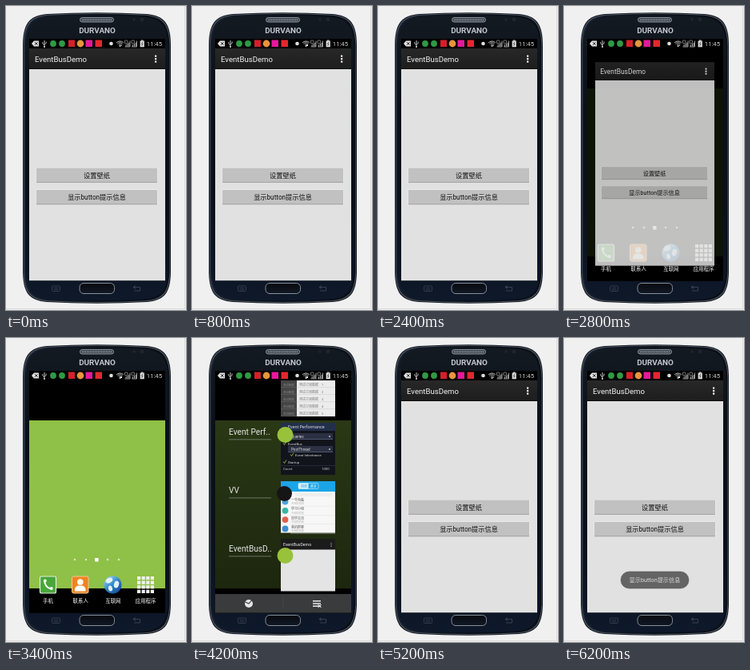
Recreate the animation shown at these times as an HTML page with a canvas. Size 225 by 380 pixels, loop 8000 ms.

```html
<!DOCTYPE html>
<html lang="zh-CN">
<head>
<meta charset="utf-8">
<title>EventBusDemo</title>
<style>
  html, body { margin: 0; width: 100%; height: 100%; overflow: hidden; background: #f0f0f0; }
  canvas { display: block; width: 225px; height: 380px; }
</style>
</head>
<body>
<canvas id="stage"></canvas>
<script>
const W = 225, H = 380, LOOP = 8000;
const SCREEN = { x: 29, y: 41, w: 170, h: 302.5 };
const FONT = 'Roboto, "Noto Sans CJK SC", "Noto Sans CJK", sans-serif';
const dpr = window.devicePixelRatio || 1;

function setup(canvas) {
  canvas.width = W * dpr;
  canvas.height = H * dpr;
  const c = canvas.getContext('2d');
  c.scale(dpr, dpr);
  return c;
}

const stage = setup(document.getElementById('stage'));
const layer = setup(document.createElement('canvas'));
let ctx = stage;

function rect(x, y, w, h, fill) {
  ctx.fillStyle = fill;
  ctx.fillRect(x, y, w, h);
}

function round(x, y, w, h, r, fill, stroke, line = 1) {
  ctx.beginPath();
  ctx.roundRect(x, y, w, h, r);
  if (fill) { ctx.fillStyle = fill; ctx.fill(); }
  if (stroke) { ctx.strokeStyle = stroke; ctx.lineWidth = line; ctx.stroke(); }
}

function disc(x, y, r, fill) {
  ctx.beginPath();
  ctx.arc(x, y, r, 0, Math.PI * 2);
  ctx.fillStyle = fill;
  ctx.fill();
}

function path(points, stroke, line = 1) {
  ctx.beginPath();
  points.forEach(([x, y], i) => i ? ctx.lineTo(x, y) : ctx.moveTo(x, y));
  ctx.strokeStyle = stroke;
  ctx.lineWidth = line;
  ctx.stroke();
}

function text(str, x, y, size, fill, align = 'left', style = '') {
  ctx.font = `${style} ${size}px ${FONT}`;
  ctx.textAlign = align;
  ctx.fillStyle = fill;
  ctx.fillText(str, x, y);
}

function gradient(x0, y0, x1, y1, ...colors) {
  const g = ctx.createLinearGradient(x0, y0, x1, y1);
  colors.forEach((c, i) => g.addColorStop(i / (colors.length - 1), c));
  return g;
}

// Phone outline with bowed top and bottom edges.
function drawBody(inset, fill) {
  const l = 21 + inset, r = 206 - inset, t = 8 + inset, b = 372 - inset;
  ctx.beginPath();
  ctx.moveTo(l, t + 42);
  ctx.bezierCurveTo(l, t + 14, l + 8, t + 4, l + 30, t + 2);
  ctx.quadraticCurveTo(113.5, t - 1.5, r - 30, t + 2);
  ctx.bezierCurveTo(r - 8, t + 4, r, t + 14, r, t + 42);
  ctx.lineTo(r, b - 38);
  ctx.bezierCurveTo(r - 1, b - 13, r - 8, b - 4, r - 30, b - 2);
  ctx.quadraticCurveTo(113.5, b + 1.5, l + 30, b - 2);
  ctx.bezierCurveTo(l + 8, b - 4, l + 1, b - 13, l, b - 38);
  ctx.closePath();
  ctx.fillStyle = fill;
  ctx.fill();
}

function drawPhone() {
  rect(0, 0, W, H, '#f0f0f0');
  rect(223, 0, 1, 379, '#d9d9d9');
  rect(0, 378, 224, 1, '#d9d9d9');

  drawBody(0, '#10151d');
  drawBody(0.8, '#4a535f');
  drawBody(1.7, gradient(21, 0, 206, 0, '#16202d', '#0a0f17', '#0a0e15'));
  drawBody(3.5, gradient(0, 8, 0, 372, '#141a22', '#0a0f17', '#0a101a', '#0e192b'));

  round(92.5, 14.5, 42, 5.5, 2.7, '#3c434d', '#a5abb3', 0.8);
  for (let x = 95; x < 133; x += 2) rect(x, 16, 1, 2.5, '#888e97');
  disc(160, 17, 1.8, '#20262e');
  disc(170, 17, 2.4, '#20262e');
  text('DURVANO', 114, 34, 9.9, '#c3c7ce', 'center', 'bold');

  round(92, 346.5, 43.5, 13, 5, gradient(0, 346, 0, 360, '#06090f', '#131a26'), '#969ba3', 0.9);
  round(57.5, 350, 10, 6.5, 1, null, '#3c4656', 0.8);
  for (let y = 352; y < 356; y += 2) rect(59.5, y, 6, 0.7, '#3c4656');
  path([[162, 349.5], [159, 351.5], [162, 353.5]], '#3c4656', 0.9);
  path([[159, 351.5], [167.5, 351.5], [167.5, 356], [160, 356]], '#3c4656', 0.9);
}

function drawSim(x) {
  path([[x, 51], [x + 6.5, 51], [x + 6.5, 43.5]], '#b5b5b5', 0.8);
  for (let i = 0; i < 3; i++) rect(x + 1 + i * 1.9, 48.5 - i * 1.4, 1, 2 + i * 1.4, '#c4c4c4');
  round(x, 43, 3.4, 3.8, 0.5, null, '#aaa', 0.7);
}

function drawStatus(wifiBusy) {
  // keyboard tag
  ctx.beginPath();
  ctx.moveTo(32, 47);
  [[35, 43.5], [41, 43.5], [41, 50.5], [35, 50.5]].forEach(p => ctx.lineTo(...p));
  ctx.fillStyle = '#e2e2e2';
  ctx.fill();
  path([[36, 45.2], [39.5, 48.8]], '#111', 1);
  path([[39.5, 45.2], [36, 48.8]], '#111', 1);

  // usb
  path([[48, 43], [48, 51]], '#d8d8d8', 0.9);
  path([[45.8, 45], [45.8, 47], [48, 49]], '#d8d8d8', 0.8);
  path([[50.2, 44.5], [50.2, 46.5], [48, 48]], '#d8d8d8', 0.8);
  disc(48, 51, 1, '#d8d8d8');

  disc(59, 47, 3.9, '#2f9a45');
  disc(70, 47, 3.9, '#2f9a45');
  rect(78, 42.5, 8, 8.5, '#d6202a');
  disc(93, 47, 4.4, '#e8953c');
  rect(99.5, 42.5, 8.5, 8.5, '#e6189a');
  rect(111.5, 42.5, 8.5, 8.5, '#e5262f');
  disc(131.5, 47, 2.3, '#e0e0e0');

  // wifi
  ctx.lineWidth = 1;
  ctx.strokeStyle = '#bdbdbd';
  for (const r of [2.2, 4.2, 6]) {
    ctx.beginPath();
    ctx.arc(142.5, 50, r, -Math.PI * 0.77, -Math.PI * 0.23);
    ctx.stroke();
  }
  disc(142.5, 50, 1, '#d0d0d0');
  rect(143, 48, 2, 2, wifiBusy ? '#f2f2f2' : '#777');

  drawSim(148.5);
  drawSim(157);
  rect(169, 42.5, 2.5, 1.2, '#ddd');
  rect(167.6, 43.5, 5.2, 7.8, '#dedede');
  path([[171, 44.8], [169.4, 47.4], [171, 47.4], [169.6, 50]], '#333', 0.7);
  text('11:45', 195, 50, 7.7, '#d2d2d2', 'right');
}

function drawButton(label, y) {
  rect(37.5, y, 152, 19, '#f0f0f0');
  rect(38, y + 0.5, 151, 18, '#c1c1c1');
  rect(38, y + 17.8, 151, 1, '#a0a0a0');
  text(label, 113.5, y + 12.7, 8.2, '#111', 'center');
}

function drawApp() {
  rect(29, 53, 170, 26, gradient(0, 53, 0, 79, '#282828', '#1d1d1d'));
  rect(29, 78, 170, 1, '#111');
  rect(29, 79, 170, 264.5, '#e1e1e1');
  text('EventBusDemo', 36, 69.8, 9.6, '#f2f2f2');
  for (const y of [61.5, 65, 68.5]) rect(186, y, 2.2, 2.2, '#f2f2f2');
  drawButton('设置壁纸', 202);
  drawButton('显示button提示信息', 229.5);
}

// The whole app window, scaled about its middle and faded as one layer.
function drawScaledApp(scale, cx, cy, alpha) {
  const place = c => {
    c.translate(cx, cy);
    c.scale(scale, scale);
    c.translate(-114, -198);
  };
  layer.clearRect(0, 0, W, H);
  layer.save();
  place(layer);
  ctx = layer;
  drawApp();
  ctx = stage;
  layer.restore();

  ctx.globalAlpha = alpha;
  ctx.drawImage(layer.canvas, 0, 0, W, H);
  ctx.globalAlpha = 1;
}

function drawToast(message, x, w) {
  round(x, 292, w, 21, 10.5, '#646464', '#575757', 0.6);
  text(message, x + w / 2, 305.2, 7.2, '#dadada', 'center');
}

function drawWallpaper(top = 0, bottom = top) {
  rect(29, 41, 170, 303, '#000');
  rect(29, 103, 170, 210, '#8fc047');
  rect(29, 41, 170, 303, gradient(0, 90, 0, 313, `rgba(0,0,0,${top})`, `rgba(0,0,0,${bottom})`));
}

function drawHomeItems() {
  [86, 100, 127, 141].forEach(x => disc(x, 277, 1.3, '#d8e4c4'));
  round(111, 275, 4.6, 4.6, 1, '#fff');

  round(42.5, 298, 20, 21, 2, '#49a83a', '#e4efe0', 1.2);
  ctx.beginPath();
  ctx.moveTo(48, 303);
  ctx.quadraticCurveTo(48.5, 312, 57.5, 314);
  ctx.strokeStyle = '#fff';
  ctx.lineWidth = 2;
  ctx.stroke();
  disc(48.8, 303.5, 1.9, '#fff');
  disc(56.8, 313, 1.9, '#fff');

  round(82.5, 298, 20.5, 21, 2, '#ef8420', '#f5c795', 1);
  disc(92.8, 305, 3.8, '#fff');
  round(86, 309.5, 13.5, 7, [5, 5, 0, 0], '#fff');

  disc(133.5, 308.5, 11, gradient(125, 298, 142, 319, '#9fd8f6', '#2c84cb', '#124a8c'));
  ctx.fillStyle = '#e4f2f4';
  for (const [x, y, rx, ry, a] of [[129, 303, 4.5, 3, -0.5], [138, 308, 3, 4.5, 0.3], [130.5, 313, 2.5, 3.5, -0.2]]) {
    ctx.beginPath();
    ctx.ellipse(x, y, rx, ry, a, 0, Math.PI * 2);
    ctx.fill();
  }

  for (let i = 0; i < 16; i++) rect(164 + (i % 4) * 5.6, 298 + (i >> 2) * 5.6, 4.2, 4.2, '#f0f0f0');

  ['手机', '联系人', '互联网', '应用程序'].forEach((s, i) =>
    text(s, 52.5 + i * 40.7, 330.8, 6.4, '#fff', 'center'));
}

function drawSettingsThumb() {
  rect(111, 53, 68, 45, '#ececec');
  rect(111, 53, 20, 45, '#454545');
  for (let i = 0; i < 5; i++) {
    const y = 59.5 + i * 9;
    rect(111, y + 2, 20, 0.6, '#666');
    rect(131, y + 2, 48, 0.6, '#cfcfcf');
    text('测试数据', 114, y, 3.4, '#8a8a8a');
    text('测试订阅数据', 134, y, 4, '#777');
    text(String(i + 1), 162, y, 4, '#777');
  }
}

function drawPerfThumb() {
  rect(111, 106, 68, 65, '#12141c');
  rect(111, 106, 68, 10, '#222f4c');
  text('Event Performance', 120, 113, 5.4, '#ddd');
  for (const [s, x, y, w] of [['Queries', 120, 119, 56], ['PostThread', 120, 135, 56]]) {
    rect(x, y, w, 8, '#2b3042');
    rect(x, y + 7.4, w, 0.6, '#66708a');
    text(s, x + 4, y + 5.8, 4.6, '#ddd');
    disc(x + w - 4, y + 4, 0.9, '#ccc');
  }
  for (const [s, x, y] of [['EventBus', 115, 133.5], ['Event Inheritance', 124, 147.5], ['Startup', 115, 156.5]]) {
    path([[x - 1, y - 2], [x + 0.5, y], [x + 3, y - 4]], '#9dbb3a', 0.9);
    text(s, x + 5, y, 4.3, '#ddd');
  }
  rect(111, 159, 68, 0.6, '#333a4c');
  text('Count', 114, 165, 4.3, '#ccc');
  text('1000', 162, 165, 4.3, '#ccc');
}

function drawChatThumb() {
  rect(111, 179, 68, 64.5, '#f7f7f7');
  rect(111, 179, 68, 13, '#1ba4e6');
  round(133, 181.5, 25, 7, 1.5, null, '#d6f0fd', 0.6);
  rect(133, 181.5, 12.5, 7, '#d6f0fd');
  text('消息', 136, 186.7, 4, '#1b8fcb');
  text('通话', 147.5, 186.7, 4, '#fff');
  rect(129, 194, 47, 4, '#eee');
  const rows = [['一号电脑', '#4aa3dc'], ['学习小组', '#39b5a5'], ['同学交流', '#e0604f'], ['我的群聊', '#3b8ed0']];
  rows.forEach(([s, c], i) => {
    const y = 204.5 + i * 11.3;
    disc(116.5, y, 3.9, c);
    text(s, 124, y - 0.4, 4, '#555');
    text('今天的消息', 124, y + 3.8, 3.2, '#aaa');
    rect(123, y + 5.4, 56, 0.5, '#dedede');
  });
}

function drawDemoThumb() {
  rect(111, 251, 68, 65.5, '#e4e4e4');
  rect(111, 251, 68, 13.5, '#1b1b1b');
  text('EventBusDemo', 114, 260, 5.2, '#eee');
  for (const y of [256, 258, 260]) rect(173.5, y, 1, 1, '#ddd');
}

function drawRecents() {
  drawWallpaper(0.7, 0.8);
  drawSettingsThumb();
  drawPerfThumb();
  drawChatThumb();
  drawDemoThumb();
  disc(116.5, 121, 10, '#98c23a');
  disc(115.5, 194.5, 9.5, '#151515');
  disc(116.5, 272, 10, '#98c23a');
  ['Event Perf..', 'VV', 'EventBusD..'].forEach((s, i) => {
    text(s, 46, 121.3 + i * 73, 10.2, '#e4e4e4');
    rect(46, 126.5 + i * 73, 53, 0.8, '#7f8578');
  });

  rect(29, 320, 170, 24, '#3a3b3d');
  rect(113.5, 324, 0.7, 15, '#4a4b4e');
  disc(71, 332, 5, '#e6e6e6');
  path([[66.5, 330], [71, 332], [74.5, 328]], '#3a3b3d', 1.1);
  for (const y of [328, 331.2, 334.4]) rect(151, y, 10, 1.6, '#dcdcdc');
  path([[157.5, 333], [161.5, 337]], '#fff', 1);
  path([[161.5, 333], [157.5, 337]], '#fff', 1);
}

const scenes = {
  app: drawApp,
  wallpaperToast() { drawApp(); drawToast('壁纸设置完成！', 76, 75); },
  buttonToast() { drawApp(); drawToast('显示button提示信息', 71, 85); },
  closing() { drawWallpaper(0.9); drawHomeItems(); drawScaledApp(0.876, 113.5, 197.2, 0.85); },
  home() { drawWallpaper(); drawHomeItems(); },
  recents: drawRecents,
  opening() { drawRecents(); drawScaledApp(0.98, 114, 200, 1); }
};

const timeline = [
  [0, 'app'], [1200, 'wallpaperToast'], [2400, 'app'], [2800, 'closing'], [3000, 'home'],
  [4200, 'recents'], [4800, 'opening'], [5200, 'app'], [5800, 'buttonToast']
];
const wifiFlips = [800, 1800, 3400, 4400, 6200];

function draw(t) {
  const scene = timeline.filter(([start]) => start <= t).pop()[1];
  const wifiBusy = wifiFlips.filter(f => f <= t).length % 2 === 1;
  drawPhone();
  ctx.save();
  ctx.beginPath();
  ctx.rect(SCREEN.x, SCREEN.y, SCREEN.w, SCREEN.h);
  ctx.clip();
  rect(29, 41, 170, 303, '#000');
  scenes[scene]();
  rect(29, 41, 170, 12, '#000');
  drawStatus(wifiBusy);
  ctx.restore();
}

const start = performance.now();
function tick() {
  draw((performance.now() - start) % LOOP);
  requestAnimationFrame(tick);
}
tick();
</script>
</body>
</html>
```
